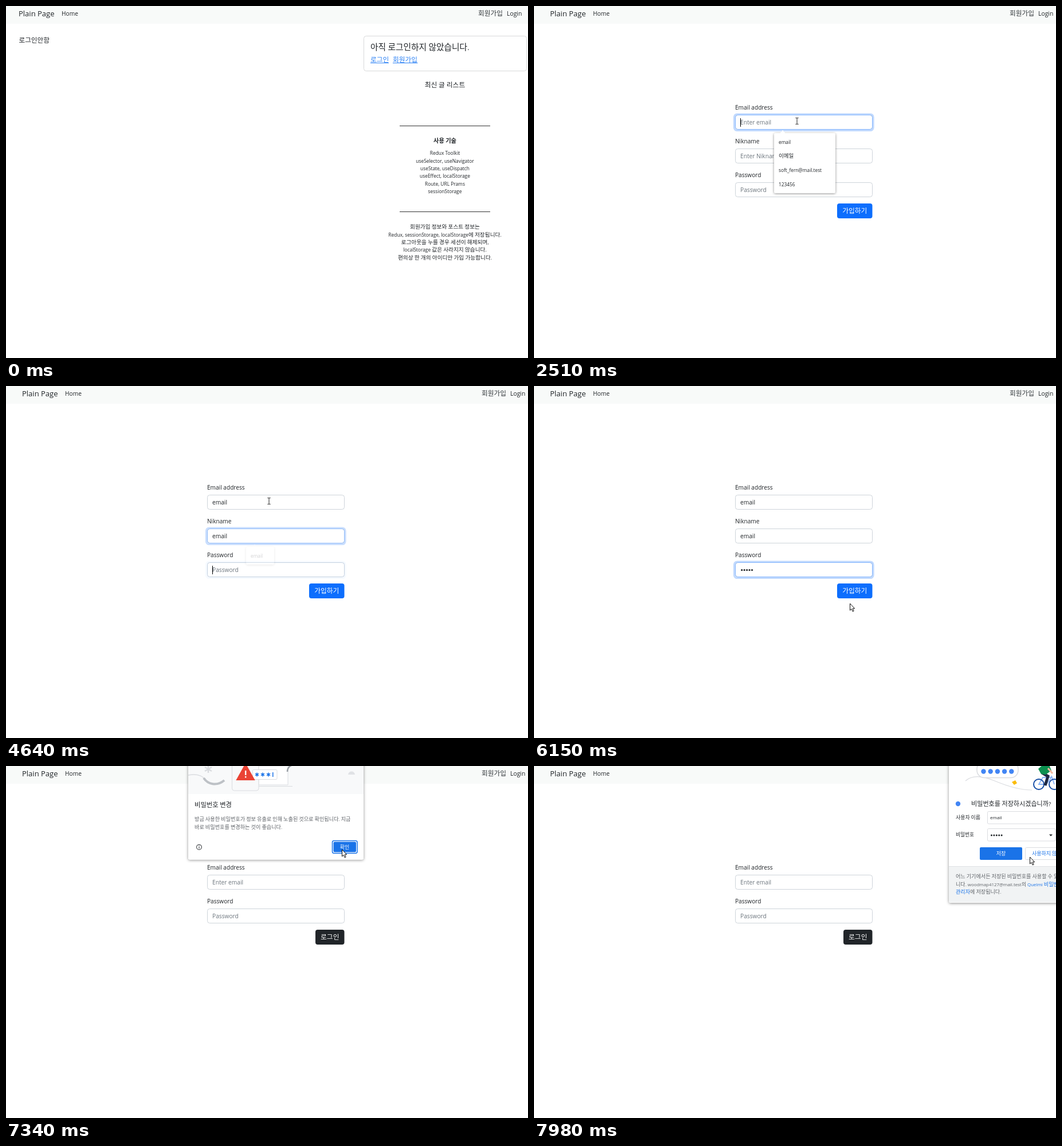
These frames come from a looping animation (911x615 px, 8000 ms). An HTML page with a canvas:

```html
<!DOCTYPE html>
<html lang="ko">
<head>
<meta charset="utf-8">
<title>Sign-up demo</title>
<style>
html, body { margin: 0; width: 100%; height: 100%; overflow: hidden; background: #fff; }
canvas { display: block; }
</style>
</head>
<body>
<canvas id="stage" width="911" height="615"></canvas>
<script>
const ctx = document.getElementById('stage').getContext('2d');
const LOOP = 8000, INK = '#212529', BLUE = '#0d6efd', LINK = '#1a73e8', GREY = '#5f6368';
const LATIN = '"Open Sans", sans-serif', HANGUL = '"Noto Sans CJK KR", "Noto Sans CJK", sans-serif';
const clamp = v => Math.max(0, Math.min(1, v));
const ease = v => v * v * (3 - 2 * v);
const ramp = (t, start, length) => ease(clamp((t - start) / length));

// Times of the visible steps
const SIGNUP = 1380, LOGIN = 6430;
const FOCUS = [[2360, 3700], [3700, 4605], [4605, 6340]];
const KEYS = [
  [2930, 3110, 3310, 3380, 3580],
  [3900, 4080, 4200, 4350, 4450],
  [4900, 5010, 5120, 5190, 5340]
];
const CARET_RESETS = [2430, 3700, 4605, ...KEYS.flat()];
const CLICKS = [[1230, 1380], [2350, 2430], [6330, 6430], [7380, 7440]];
const PATH = [
  [60, 884, 616], [350, 872, 230], [640, 846, 14], [900, 846, 14], [1220, 691, 97],
  [1630, 691, 97], [2330, 459, 201], [5850, 459, 201], [6140, 551, 380], [6170, 551, 380],
  [6320, 562, 352], [6440, 562, 352], [7000, 588, 150], [7150, 588, 150], [7310, 586, 146],
  [7450, 586, 146], [7950, 865, 159]
];

// Hangul runs are set slightly larger and lighter than Latin ones, on one baseline.
function text(str, x, y, size, { color = INK, align = 0, bold = false } = {}) {
  const runs = str.match(/[가-힣]+|[^가-힣]+/g) || [];
  const fontOf = run => /[가-힣]/.test(run)
    ? `${bold ? 700 : 350} ${size * 1.15}px ${HANGUL}`
    : `${bold ? 700 : 400} ${size}px ${LATIN}`;
  const widths = runs.map(run => { ctx.font = fontOf(run); return ctx.measureText(run).width; });
  const total = widths.reduce((a, b) => a + b, 0);
  let left = x - total * align;
  ctx.fillStyle = color;
  runs.forEach((run, i) => {
    ctx.font = fontOf(run);
    ctx.fillText(run, left, y + size * 0.39);
    left += widths[i];
  });
  return total;
}
const centered = (str, x, y, size, style) => text(str, x, y, size, { align: 0.5, ...style });

function rect(x, y, w, h, color) {
  ctx.fillStyle = color;
  ctx.fillRect(x, y, w, h);
}
function box(x, y, w, h, r, fill, stroke, line = 1) {
  ctx.beginPath();
  ctx.roundRect(x, y, w, h, r);
  if (fill) { ctx.fillStyle = fill; ctx.fill(); }
  if (stroke) { ctx.strokeStyle = stroke; ctx.lineWidth = line; ctx.stroke(); }
}
function circle(x, y, r, fill, stroke, line = 1) {
  box(x - r, y - r, 2 * r, 2 * r, r, fill, stroke, line);
}
function path(d, fill, stroke, line = 1) {
  const p = new Path2D(d);
  if (fill) { ctx.fillStyle = fill; ctx.fill(p); }
  if (stroke) { ctx.strokeStyle = stroke; ctx.lineWidth = line; ctx.stroke(p); }
}
function faded(alpha, draw) {
  if (alpha <= 0) return;
  ctx.save();
  ctx.globalAlpha = alpha;
  draw();
  ctx.restore();
}
// The shadow is kept outside the panel so that it stays hidden while fading.
function panel(x, y, w, h, r, blur) {
  ctx.save();
  ctx.beginPath();
  ctx.rect(0, -50, 1000, 700);
  ctx.roundRect(x, y, w, h, r);
  ctx.clip('evenodd');
  ctx.shadowColor = 'rgba(0,0,0,.45)';
  ctx.shadowBlur = blur;
  ctx.shadowOffsetY = 1;
  box(x, y, w, h, r, '#fff');
  ctx.restore();
  box(x, y, w, h, r, '#fff');
}

function pointerAt(t) {
  if (t < PATH[0][0]) return null;
  let i = PATH.findIndex(p => p[0] > t);
  if (i < 0) i = PATH.length;
  const [t0, x0, y0] = PATH[i - 1], [t1, x1, y1] = PATH[i] || [LOOP, x0, y0];
  const k = ease((t - t0) / (t1 - t0));
  return { x: x0 + (x1 - x0) * k, y: y0 + (y1 - y0) * k };
}
const over = (p, x, y, w, h) => !!p && p.x >= x && p.x <= x + w && p.y >= y && p.y <= y + h;

function drawPointer(p, kind, t) {
  if (CLICKS.some(([a, b]) => t >= a && t < b)) {
    ctx.globalCompositeOperation = 'multiply';
    circle(p.x + 0.5, p.y, 8, 'rgba(255,255,60,.75)');
    ctx.globalCompositeOperation = 'source-over';
  }
  ctx.save();
  ctx.translate(p.x, p.y);
  if (kind === 'beam') {
    path('M-2.5-5.5H-.6L0-5 .6-5.5H2.5M0-5V5M-2.5 5.5H-.6L0 5 .6 5.5H2.5', null, '#222');
  } else if (kind === 'hand') {
    path('M-1.3 8V.8Q-1.3-.6 0-.6T1.3.8V4.5Q3 3.8 3.6 5.2 5.2 4.6 5.8 6 7.6 5.6 7.6 7.4V10L6.2 12.5V14H.4V12.5L-3.2 8.4Q-3.6 6.5-1.3 8Z', '#fff', '#222');
  } else {
    path('M.5 0V12L3.2 9.5 5.2 14 7.1 13.1 5.2 8.8H8.7Z', '#fff', '#111');
  }
  ctx.restore();
}

function header(x, signupHover) {
  rect(0, 0, 911, 31, '#f8faf9');
  text('Plain Page', 22 + x, 13, 13);
  text('Home', 97 + x, 13, 10.2);
  text('회원가입', 824 + x, 13, 10.2, { color: signupHover ? '#000' : '#33383c' });
  text('Login', 874 + x, 13, 10.4);
}

function homePage(pointer) {
  header(0, over(pointer, 824, 4, 43, 18));
  text('로그인안함', 22.5, 60.5, 10.1);
  box(624.5, 52.5, 284, 61, 4, '#fff', '#d8d9da');
  text('아직 로그인하지 않았습니다.', 636, 72, 12.8);
  [['로그인', 636, 32], ['회원가입', 675, 43.5]].forEach(([label, x, w]) => {
    const color = over(pointer, x, 86, w, 16) ? '#0a58ca' : '#2a80f5';
    text(label, x, 94, 10.2, { color });
    rect(x, 99, w, 1, color);
  });
  centered('최신 글 리스트', 766, 138, 10.3);
  rect(687, 209, 158, 1, '#333');
  rect(687, 359, 158, 1, '#333');
  centered('사용 기술', 766, 236, 8.9, { bold: true });
  ['Redux Toolkit', 'useSelector, useNavigator', 'useState, useDispatch',
    'useEffect, localStorage', 'Route, URL Prams', 'sessionStorage']
    .forEach((s, i) => centered(s, 766, 257 + i * 13.4, 8.4));
  ['회원가입 정보와 포스트 정보는', 'Redux, sessionStorage, localStorage에 저장됩니다.',
    '로그아웃을 누를 경우 세션이 해제되며,', 'localStorage 값은 사라지지 않습니다.',
    '편의상 한 개의 아이디만 가입 가능합니다.']
    .forEach((s, i) => centered(s, 766, 386 + i * 13.4, 8.4));
}

function field(label, y, placeholder, value = '', ring = 0, caret = false) {
  text(label, 351, y - 26, 10.1);
  faded(ring, () => box(349.5, y - 14, 242.5, 28.5, 5, null, '#c0d9fe', 3.2));
  box(351.5, y - 12.5, 239, 25, 4, '#fff', '#ced4da');
  faded(ring, () => box(351.5, y - 12.5, 239, 25, 4, null, '#86b7fe'));
  let end = 360;
  if (value[0] === '•') {
    [...value].forEach((_, i) => circle(362.7 + i * 4.45, y + 0.5, 1.6, INK));
    end += value.length * 4.45;
  } else if (value) {
    end += text(value, 360, y, 10.2);
  } else {
    text(placeholder, 360, y, 10.2, { color: '#6c757d' });
  }
  if (caret) rect(Math.round(end), y - 7, 1, 15, '#000');
}

function button(label, x, y, w, color) {
  box(x, y, w, 26, 4, color);
  centered(label, x + w / 2, y + 13, 10.2, { color: '#fff' });
}

function suggestions(y, items, w, alpha) {
  faded(alpha, () => {
    panel(419, y, w, 6 + items.length * 24.7, 2.5, 4);
    path(`M429 ${y + 1}L434 ${y - 5}L439 ${y + 1}Z`, '#fff');
    items.forEach((s, i) => text(s, 427, y + 15.5 + i * 24.6, 8.3));
  });
}

function signupPage(t, pointer) {
  header(6, false);
  const reset = Math.max(...CARET_RESETS.filter(k => k <= t), 0);
  const blinkOn = t >= 2430 && (t - reset) % 1000 < 500;
  const names = ['Email address', 'Nikname', 'Password'];
  const hints = ['Enter email', 'Enter Nikname', 'Password'];
  names.forEach((name, i) => {
    const [start, end] = FOCUS[i];
    const typed = KEYS[i].filter(k => k <= t).length;
    const value = (i === 2 ? '•••••' : 'email').slice(0, typed);
    const ring = ramp(t, start, 150) - ramp(t, end, 150);
    field(name, 203 + 59 * i, hints[i], value, ring, blinkOn && t >= start && t < end);
  });
  button('가입하기', 529, 345, 61.5, over(pointer, 529, 345, 61, 26) ? '#0b5ed7' : BLUE);
  if (t >= 2420 && t < 2950) {
    suggestions(222, ['email', '이메일', 'soft_fern@mail.test', '123456'], 107, 1);
  } else if (t >= 2950) {
    suggestions(222, ['email'], 49, 1 - clamp((t - 3700) / 45));
  }
  suggestions(281, ['email'], 49, clamp((t - 3890) / 40) - clamp((t - 4605) / 45));
}

function loginPage(pointer) {
  header(6, false);
  field('Email address', 203, 'Enter email');
  field('Password', 262, 'Password');
  button('로그인', 540, 286, 50.5, over(pointer, 540, 286, 50, 26) ? '#424649' : INK);
}

function warningDialog() {
  panel(318, -20, 306, 183.5, 3, 5);
  rect(318, 0, 306, 49, '#f8f9fa');
  path('M318 16C338 12 345 20 352 27S370 34 381 25', null, '#dadce0', 1.5);
  path('M345 21C352 32 368 36 381 25', null, '#bdc1c6', 4);
  path('M353-1V12M347 2L359 9M347 9L359 2', null, '#dadce0', 2.5);
  path('M441 0H492V33H441Z', '#fff', '#dadce0');
  path('M441 35.5H500', null, '#dadce0');
  path('M491 10Q491 2 498-1', null, '#9aa0a6', 2.5);
  box(394.5, -8, 46.5, 51, 4, '#f8f9fa', '#dadce0');
  box(430.5, 6.5, 42.5, 17, 2, '#fff', '#dadce0');
  [438, 448, 458].forEach(x =>
    path(`M${x} 11.5V18.5M${x - 3} 13.2L${x + 3} 16.8M${x - 3} 16.8L${x + 3} 13.2`, null, LINK, 1.5));
  rect(465, 11, 1.5, 8, LINK);
  path('M403 24L418-3 433 24Z', '#ea4335', '#ea4335', 2);
  rect(417, 8, 2.4, 8, '#fff');
  rect(417, 18, 2.4, 2.4, '#fff');
  path('M597 15Q598 9.5 603 9.5T609 15Z', '#e0e2e5');
  text('비밀번호 변경', 329, 68, 9.85);
  text('방금 사용한 비밀번호가 정보 유출로 인해 노출된 것으로 확인됩니다. 지금', 329, 93, 7.95, { color: GREY });
  text('바로 비밀번호를 변경하는 것이 좋습니다.', 329, 106.5, 7.95, { color: GREY });
  circle(337, 141.8, 4.4, null, '#4a4d51', 1.2);
  rect(336.4, 141, 1.2, 3.2, '#4a4d51');
  rect(336.4, 139, 1.2, 1.2, '#4a4d51');
  box(569.5, 130.5, 43.5, 22, 3, '#fff', LINK, 1.5);
  box(571.5, 132.5, 39.5, 18, 2, LINK);
  centered('확인', 591, 141.5, 7.8, { color: '#fff' });
}

function savePopup(t) {
  panel(724, -20, 210, 259, 3, 5);
  path('M753 26C765 15 785 18 804 26S845 42 869 42', null, '#dadce0', 1.2);
  box(773, -8, 72, 28.5, 13, '#fff', '#dadce0', 1.5);
  for (let i = 0; i < 5; i++) circle(784.5 + i * 12.2, 9.5, 4.2, '#4285f4');
  path('M834 28L840 25 843 30 838 33Z', '#fbbc04');

  path('M881 32L888 20H903L894 32ZM903 17L908 32', null, '#8ab4f8', 1.8);
  circle(881, 32, 9, null, '#174ea6', 2);
  circle(908, 32, 9, null, '#174ea6', 2);
  path('M887 12L897 18 892 34', null, '#202a44', 5);
  path('M885 14L880 5 888-2H899L903 8 893 15Z', '#0d904f');
  path('M897 4L905 13', null, '#f2b8a0', 3);

  circle(740, 66, 4.2, '#4285f4');
  text('비밀번호를 저장하시겠습니까?', 763, 66, 9.65);
  text('사용자 이름', 736, 90, 7.75);
  text('비밀번호', 736, 120, 7.6);
  box(791.5, 79.5, 130, 21.5, 2, '#fff', '#dadce0');
  box(791.5, 109.5, 118.5, 21.5, 2, '#fff', '#dadce0');
  text('email', 796, 90, 8);
  for (let i = 0; i < 5; i++) circle(798.5 + i * 4.4, 121, 1.5, INK);
  path('M899 119.5H905L902 122.8Z', INK);
  box(778, 142, 74, 22, 2, t >= 7820 && t < 7980 ? '#3b86eb' : LINK);
  centered('저장', 815, 153, 7.8, { color: '#fff' });
  box(857.5, 142.5, 74, 21, 2, '#fff', '#dadce0');
  text('사용하지 않음', 869, 153, 7.8, { color: LINK });

  rect(724, 175, 187, 63, '#f1f3f4');
  rect(724, 175, 187, 1, '#dfe1e4');
  const note = { color: GREY }, link = { color: LINK };
  text('어느 기기에서든 저장된 비밀번호를 사용할 수 있습', 736, 193, 7.9, note);
  const w = text('니다. woodmap4127@mail.test의 ', 736, 207, 7.9, note);
  text('Quelmi 비밀번호', 736 + w, 207, 7.9, link);
  const v = text('관리자', 736, 220, 7.9, link);
  text('에 저장됩니다.', 736 + v, 220, 7.9, note);
}

function pointerKind(t, p) {
  const hits = boxes => boxes.some(b => over(p, ...b));
  if (t < SIGNUP) return hits([[824, 4, 77, 18], [636, 86, 83, 16]]) ? 'hand' : 'arrow';
  if (t < LOGIN) {
    if (hits([[529, 345, 61, 26]])) return 'hand';
    return hits([0, 1, 2].map(i => [351, 190 + 59 * i, 239, 26])) ? 'beam' : 'arrow';
  }
  if (hits([[540, 286, 50, 26]])) return 'hand';
  return hits([[351, 190, 239, 26], [351, 249, 239, 26]]) ? 'beam' : 'arrow';
}

function draw(t) {
  const pointer = pointerAt(t);
  rect(0, 0, 911, 615, '#fff');
  if (t < SIGNUP) homePage(pointer);
  else if (t < LOGIN) signupPage(t, pointer);
  else loginPage(pointer);
  faded(ramp(t, 6660, 150) - ramp(t, 7440, 100), warningDialog);
  faded(ramp(t, 7500, 150), () => savePopup(t));
  if (pointer) drawPointer(pointer, pointerKind(t, pointer), t);
}

const began = performance.now();
function tick() {
  draw((performance.now() - began) % LOOP);
  requestAnimationFrame(tick);
}
tick();
</script>
</body>
</html>
```
